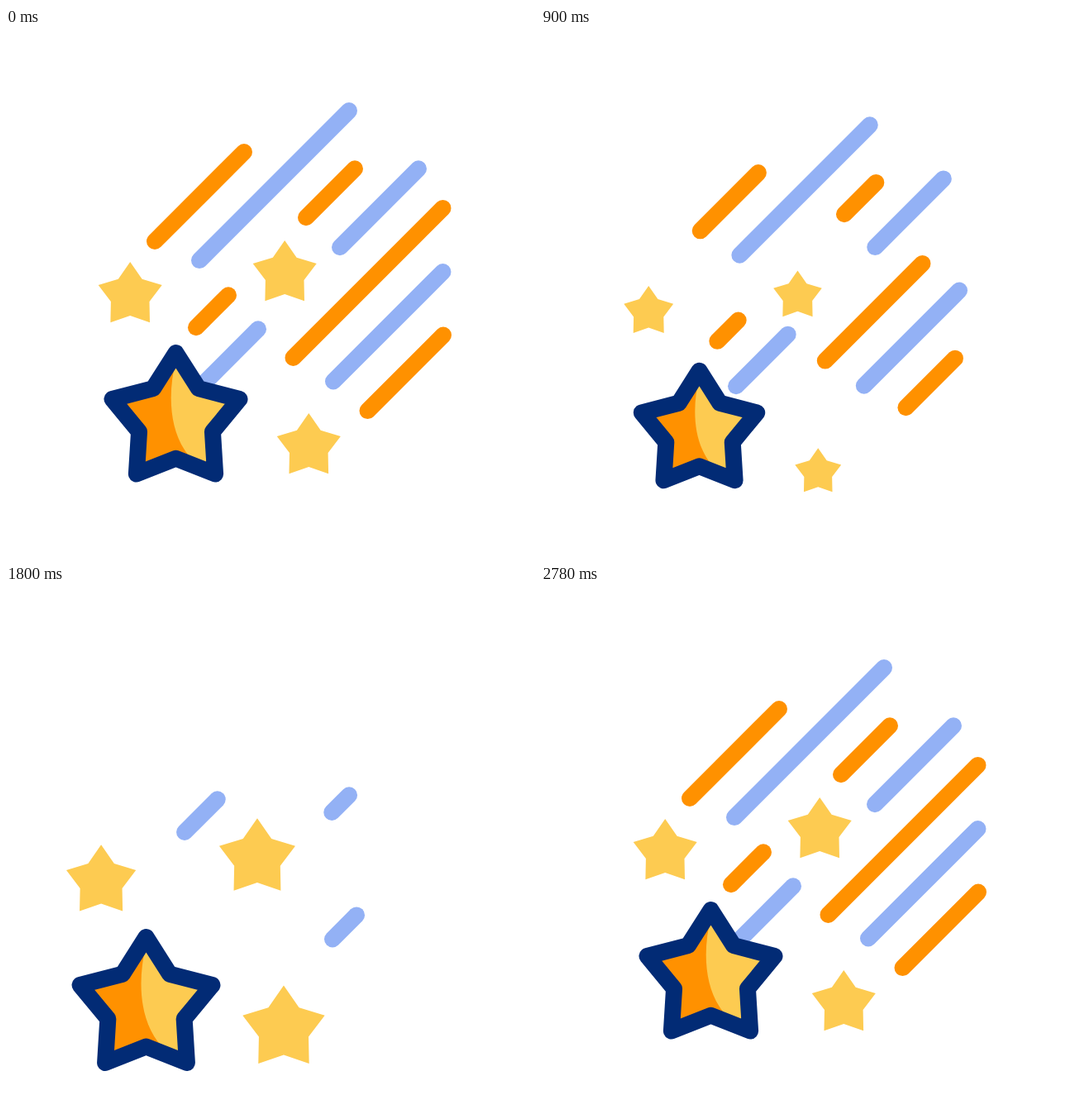
Write an HTML page that moves like this. It is 640x640 px and loops after 3 s.

```html
<!DOCTYPE html>
<html lang="en">
<head>
<meta charset="utf-8">
<title>Shooting stars</title>
<style>
  html, body { margin: 0; width: 100%; height: 100%; overflow: hidden; background: #fff; }
  svg { display: block; width: 100vw; height: 100vh; }
</style>
</head>
<body>
<svg id="stage" viewBox="0 0 640 640"></svg>
<script>
const LOOP = 3000, START = 200, REACH = 36;
const NAVY = '#022b75', ORANGE = '#ff9100', YELLOW = '#fdcb51', BLUE = '#93b1f5';
const stage = document.getElementById('stage');

function add(tag, attrs) {
  const el = document.createElementNS('http://www.w3.org/2000/svg', tag);
  for (const k in attrs) el.setAttribute(k, attrs[k]);
  return stage.appendChild(el);
}

// Eases from turning point to turning point: [time, value], ...
function swing(...keys) {
  return t => {
    const next = keys.findIndex(k => k[0] > t);
    if (next === 0) return keys[0][1];
    if (next < 0) return keys[keys.length - 1][1];
    const [t0, v0] = keys[next - 1], [t1, v1] = keys[next];
    const u = (t - t0) / (t1 - t0);
    return v0 + (v1 - v0) * u * u * (3 - 2 * u);
  };
}

// Two trips down-left and back: out, far, home, out, far, home.
const trips = (...times) =>
  swing(...times.map((t, i) => [t, i % 3 === 1 ? REACH : 0]));

const bigDrift = trips(START, 670, 1070, 1375, 1800, 2223);

// ---- streaks, on parallel diagonal lanes
// A pulse grows out of the upper end, then shrinks into the lower end.
const orange = {
  colour: ORANGE,
  slide: swing([START, 0], [620, -14], [1250, 50], [1900, -38], [2480, 0]),
  pulses: [[0, START, 540], [640, 780, 1123], [1276, 1440, 1723], [1945, 2280]]
};
const blue = {
  colour: BLUE,
  slide: swing([START, 0], [600, -13.5], [1300, 37], [2040, -36], [2360, -36], [2640, 0]),
  pulses: [[0, START, 763], [763, 826, 1394], [1394, 1540, 1873], [2230, 2700]]
};

function streak(kind, lane, x0, x1, lag, pull = 0) {
  const sum = 438 + 77.1 * lane;
  const el = add('line', {
    stroke: kind.colour, 'stroke-width': 20, 'stroke-linecap': 'round'
  });
  return t => {
    const pulse = kind.pulses.find(([from, , gone = LOOP + START]) => t >= from && t < gone);
    el.setAttribute('visibility', pulse ? 'visible' : 'hidden');
    if (!pulse) return;
    const [from, full, gone] = pulse, growing = t < full;
    const share = growing ? (t - from) / (full - from) : gone ? (gone - t) / (gone - full) : 1;
    const len = (x1 - x0) * share;
    const left = kind.slide(t - lag) - pull * bigDrift(t) + (growing ? x1 - len : x0);
    const right = left + len;
    el.setAttribute('x1', left);
    el.setAttribute('y1', sum - left);
    el.setAttribute('x2', right);
    el.setAttribute('y2', sum - right);
  };
}

// ---- stars
function starPoints(r, ratio) {
  return Array.from({ length: 10 }, (_, i) => {
    const a = (i * 36 - 90) * Math.PI / 180, q = i % 2 ? r * ratio : r;
    return [q * Math.cos(a), q * Math.sin(a)].map(v => v.toFixed(2)).join(' ');
  });
}
const closed = pts => 'M' + pts.join('L') + 'Z';
const place = (el, x, y, d) => el.setAttribute('transform', `translate(${x - d} ${y + d})`);

function smallStar(x, y, drift, size) {
  const el = add('path', { fill: YELLOW });
  return t => {
    el.setAttribute('d', closed(starPoints(40.5 * size(t), .605)));
    place(el, x, y, drift(t));
  };
}

function bigStar(x, y, drift, size) {
  const base = add('path', { fill: ORANGE });
  const light = add('path', { fill: YELLOW });
  const rim = add('path', {
    fill: 'none', stroke: NAVY, 'stroke-width': 20, 'stroke-linejoin': 'round'
  });
  return t => {
    const k = size(t), pts = starPoints(81 * k, .577);
    const p = (a, b) => `${(a * k).toFixed(2)} ${(b * k).toFixed(2)} `;
    base.setAttribute('d', closed(pts));
    rim.setAttribute('d', closed(pts));
    light.setAttribute('d', 'M' + pts.slice(0, 5).join('L') + 'L' + p(28, 57) + 'L' + p(24, 52)
      + 'C' + p(-8, 24) + p(-11, -28) + p(0, -72) + 'Z');
    for (const el of [base, light, rim]) place(el, x, y, drift(t));
  };
}

const parts = [
  streak(blue, 1, 234, 415, 0),
  streak(blue, 3, 404, 499, 60),
  streak(blue, 5, 396, 528.5, 120),
  streak(blue, 3, 233, 305, -60, .7),
  streak(orange, 0, 180, 288, 0),
  streak(orange, 2, 363, 422, 60),
  streak(orange, 4, 347.5, 528.5, 120),
  streak(orange, 2, 230, 269, 180, .5),
  streak(orange, 6, 437.5, 529, 60),
  smallStar(150.2, 323.5,
    trips(START, 638, 1204, 1415, 1840, 2229),
    swing([START, 1], [640, .69], [1640, 1.21], [2060, .85], [2440, 1])),
  smallStar(337.2, 297.5,
    trips(START, 716, 1270, 1459, 1870, 2239),
    swing([START, 1], [680, .7], [1700, 1.21], [2300, 1])),
  smallStar(366.3, 506.5,
    trips(448, 739, 1431, 1502, 1900, 2203),
    swing([330, 1], [840, .72], [1920, 1.31], [2500, 1])),
  bigStar(205.5, 474, bigDrift,
    swing([START, 1], [600, .835], [1620, 1.17], [2040, .835], [2420, 1]))
];

// The cycle begins when the rest pose ends, so time runs from START to START + LOOP.
function draw(ms) {
  const t = START + (ms - START + LOOP) % LOOP;
  for (const part of parts) part(t);
}

let first = null;
function tick(now) {
  if (first === null) first = now;
  draw(now - first);
  requestAnimationFrame(tick);
}
draw(0);
requestAnimationFrame(tick);
</script>
</body>
</html>
```
